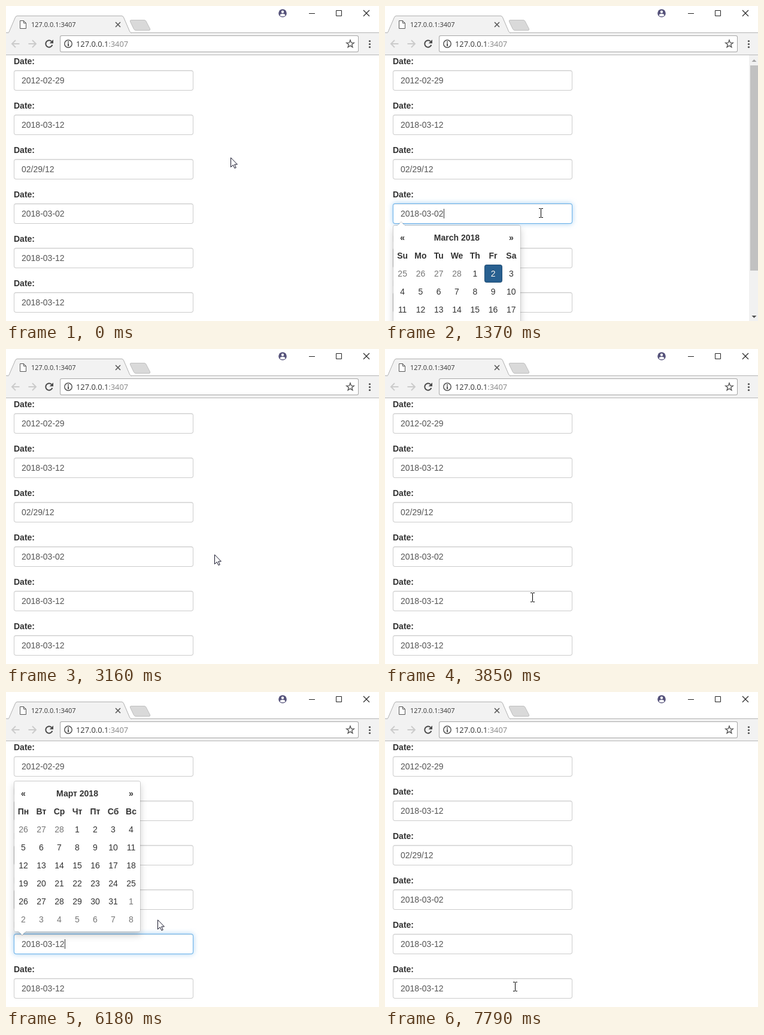
Write an HTML page with a canvas that moves like this. It is 623 px wide and 525 px high and loops after 8 s.

```html
<!DOCTYPE html>
<html lang="en">
<head>
<meta charset="utf-8">
<title>Date inputs</title>
<style>
html, body { margin: 0; width: 100%; height: 100%; overflow: hidden; background: #fff; }
canvas { display: block; }
</style>
</head>
<body>
<canvas id="stage" width="623" height="525"></canvas>
<script>
const ctx = document.getElementById('stage').getContext('2d');
const LOOP = 8000, STEP = 77;
const PAGE = '14px "Liberation Sans", Arial, sans-serif';
const BOLD = 'bold ' + PAGE;
const UI = '"Open Sans", "Noto Sans", sans-serif';

const dates = ['2012-02-29', '2018-03-12', '02/29/12', '2018-03-02', '2018-03-12', '2018-03-12'];
const inputTop = i => 107 + 74 * i;

// Pointer legs: start time, number of steps, destination
const legs = [
  [440, 10, 260, 345],
  [1770, 9, 351, 340],
  [3160, 10, 243, 416],
  [4790, 1, 243, 417],
  [5550, 9, 253, 379],
  [7020, 11, 217, 491]
];

// Each visit to a field: popup span, glow ramps, caret switch times
const visits = [
  { field: 3, open: 1210, close: 2930, glowIn: 1210, glowOut: 2860, caret: [1210, 1770, 2300, 2840] },
  { field: 4, open: 4080, close: 6580, glowIn: 4010, glowOut: 6565, caret: [4080, 4620, 5170, 5700, 6175, 6580] }
];

const calendars = {
  3: { top: 365, cell: 212 / 7, title: 'March 2018', days: 'Su Mo Tu We Th Fr Sa', lead: 4, prev: 28, rows: 6, active: 2, below: true },
  4: { top: 148, cell: 30, title: 'Март 2018', days: 'Пн Вт Ср Чт Пт Сб Вс', lead: 3, prev: 28, rows: 6, below: false }
};

const clamp = v => Math.max(0, Math.min(1, v));
const smooth = p => p * p * (3 - 2 * p);

function box(x, y, w, h, r) {
  const p = new Path2D();
  p.roundRect(x, y, w, h, r);
  return p;
}

function rect(x, y, w, h, color) {
  ctx.fillStyle = color;
  ctx.fillRect(x, y, w, h);
}

function disc(x, y, r, color) {
  ctx.fillStyle = color;
  ctx.beginPath();
  ctx.arc(x, y, r, 0, 7);
  ctx.fill();
}

function shape(d, fill, stroke, width = 1) {
  const p = new Path2D(d);
  if (fill) { ctx.fillStyle = fill; ctx.fill(p); }
  if (stroke) { ctx.strokeStyle = stroke; ctx.lineWidth = width; ctx.stroke(p); }
}

function text(s, x, y, font, color, align = 'left') {
  ctx.font = font;
  ctx.fillStyle = color;
  ctx.textAlign = align;
  ctx.fillText(s, x, y);
}

function drawWindow() {
  rect(0, 0, 623, 82, '#fff');
  rect(0, 44, 623, 37, '#f2f2f2');
  rect(0, 44, 623, 1, '#b4b4b4');
  rect(0, 81, 623, 1, '#b6b6b6');

  // Tab strip
  shape('M3.5 45C5 44 5.5 42 6 41L15.5 19Q16.5 16.5 19 16.5H193Q195.5 16.5 196.5 19L206 41C206.5 42 207 44 209.5 45', '#f2f2f2', '#b0b0b0');
  shape('M209 23.5H231Q233 23.5 234 25.5L240.5 38Q241.5 40.5 239 40.5H217Q214.5 40.5 213.5 38.5L207.5 26Q206.5 23.5 209 23.5Z', '#d9d9d9', '#bfbfbf');
  shape('M23.5 24.5H29.5L33.5 28.5V37.5H23.5ZM29.5 24.5V28.5H33.5', '#fff', '#555');
  text('127.0.0.1:3407', 42, 35, '11px ' + UI, '#333');
  shape('M183 27L191 35M191 27L183 35', null, '#5a5a5a', 1.7);

  // Window buttons
  disc(462, 12, 6.8, '#55527a');
  disc(462, 9.7, 2.2, '#fff');
  ctx.beginPath();
  ctx.ellipse(462, 15.2, 4.2, 2.1, 0, 0, 7);
  ctx.fill();
  rect(506, 12, 10, 1, '#222');
  shape('M551.5 7.5H560.5V16.5H551.5Z', null, '#222');
  shape('M597 7L607 17M607 7L597 17', null, '#222', 1.1);

  // Toolbar
  shape('M10 63H22.5M16 57L10 63L16 69', null, '#cbcbcb', 1.9);
  shape('M37.5 63H50M44 57L50 63L44 69', null, '#cbcbcb', 1.9);
  ctx.beginPath();
  ctx.arc(72, 63, 5.7, 0.35, 5.5);
  ctx.strokeStyle = '#484848';
  ctx.lineWidth = 2;
  ctx.stroke();
  shape('M79 56V62.3H72.7Z', '#484848');
  ctx.fillStyle = '#a6a6a6';
  ctx.fill(box(90, 49, 499, 28, 3));
  ctx.fillStyle = '#fff';
  ctx.fill(box(91, 50, 497, 26, 2));
  ctx.beginPath();
  ctx.arc(104, 63, 6.2, 0, 7);
  ctx.strokeStyle = '#555';
  ctx.lineWidth = 1.5;
  ctx.stroke();
  rect(103, 59, 2, 2, '#555');
  rect(103, 62, 2, 5, '#555');
  const urlFont = '12.85px ' + UI;
  text('127.0.0.1', 117, 68, urlFont, '#333');
  text(':3407', 117 + ctx.measureText('127.0.0.1').width, 68, urlFont, '#858585');

  ctx.beginPath();
  for (let i = 0; i < 10; i++) {
    const r = i % 2 ? 2.8 : 6.6, a = i * Math.PI / 5 - Math.PI / 2;
    ctx.lineTo(575 + r * Math.cos(a), 63.4 + r * Math.sin(a));
  }
  ctx.closePath();
  ctx.strokeStyle = '#555';
  ctx.lineWidth = 1.4;
  ctx.stroke();
  for (const y of [58, 63, 68]) disc(607.5, y + 0.5, 1.6, '#505050');
}

function drawField(i, glow) {
  const y = inputTop(i), outer = box(13, y, 300, 34, 4);
  text('Date:', 13, y - 10, BOLD, '#333');
  const mix = (a, b) => Math.round(a + (b - a) * glow);
  ctx.save();
  ctx.shadowBlur = 8;
  ctx.shadowColor = `rgba(102,175,233,${0.6 * glow})`;
  ctx.fillStyle = `rgb(${mix(204, 102)},${mix(204, 175)},${mix(204, 233)})`;
  ctx.fill(outer);
  ctx.restore();
  ctx.fillStyle = '#fff';
  ctx.fill(box(14, y + 1, 298, 32, 3));
  rect(15, y + 1, 296, 1, 'rgba(0,0,0,.06)');
  rect(15, y + 2, 296, 1, 'rgba(0,0,0,.02)');
  text(dates[i], 26, y + 22, PAGE, '#555');
}

function drawScrollbar() {
  rect(608, 82, 15, 443, '#f1f1f1');
  rect(610, 99, 13, 342, '#c1c1c1');
  shape('M612.5 93L616.5 89L620.5 93Z', '#a3a3a3');
  shape('M612.5 516L616.5 520L620.5 516Z', '#505050');
}

function drawCalendar(c) {
  const width = c.cell * 7, height = (c.rows + 2) * 30 + 10;
  const outer = box(13, c.top, width + 2, height + 2, 4);
  const inner = box(14, c.top + 1, width, height, 3);

  ctx.save();
  const outside = new Path2D();
  outside.rect(0, 0, 623, 700);
  outside.addPath(outer);
  ctx.clip(outside, 'evenodd');
  ctx.shadowColor = 'rgba(0,0,0,.175)';
  ctx.shadowBlur = 12;
  ctx.shadowOffsetY = 6;
  ctx.fillStyle = '#fff';
  ctx.fill(outer);
  ctx.restore();

  const ring = new Path2D(outer);
  ring.addPath(inner);
  ctx.fillStyle = 'rgba(0,0,0,.2)';
  ctx.fill(ring, 'evenodd');
  ctx.fillStyle = '#fff';
  ctx.fill(inner);

  const edge = c.below ? c.top + 1 : c.top + 1 + height;
  const dir = c.below ? -1 : 1;
  shape(`M20 ${edge}L27 ${edge + 7 * dir}L34 ${edge}Z`, 'rgba(0,0,0,.2)');
  shape(`M21 ${edge}L27 ${edge + 6 * dir}L33 ${edge}Z`, '#fff');
  rect(21, c.below ? edge - 1 : edge, 12, 1, '#fff');

  const colX = i => 14 + c.cell * (i + 0.5);
  const rowY = r => c.top + 26 + 30 * r;
  text('«', colX(0), rowY(0), BOLD, '#333', 'center');
  text(c.title, colX(3), rowY(0), BOLD, '#333', 'center');
  text('»', colX(6), rowY(0), BOLD, '#333', 'center');
  c.days.split(' ').forEach((d, i) => text(d, colX(i), rowY(1), BOLD, '#333', 'center'));

  for (let k = 0; k < c.rows * 7; k++) {
    const day = k - c.lead + 1, x = colX(k % 7), y = rowY(2 + Math.floor(k / 7));
    const inMonth = day >= 1 && day <= 31;
    const label = day < 1 ? c.prev + day : inMonth ? day : day - 31;
    const active = inMonth && day === c.active;
    if (active) {
      const left = Math.round(x - 15);
      ctx.fillStyle = '#204d74';
      ctx.fill(box(left, y - 20, 30, 30, 4));
      ctx.fillStyle = '#286090';
      ctx.fill(box(left + 1, y - 19, 28, 28, 3));
      text(label, x, y - 1, PAGE, 'rgba(0,0,0,.25)', 'center');
    }
    text(label, x, y, PAGE, active ? '#fff' : inMonth ? '#333' : '#777', 'center');
  }
}

function pointerAt(t) {
  let x = 375, y = 252;
  for (const [start, steps, toX, toY] of legs) {
    if (t < start) break;
    const p = smooth(clamp((Math.floor((t - start) / STEP) + 1) / steps));
    x += (toX - x) * p;
    y += (toY - y) * p;
  }
  return [Math.round(x), Math.round(y)];
}

function drawPointer(x, y) {
  const overField = x >= 13 && x < 313 && dates.some((_, i) => y >= inputTop(i) && y < inputTop(i) + 34);
  ctx.save();
  if (overField) {
    ctx.translate(x - 3, y - 8);
    for (const row of [0, 15]) {
      rect(0, row, 3, 1, '#000');
      rect(4, row, 3, 1, '#000');
    }
    rect(3, 1, 1, 14, '#000');
  } else {
    ctx.translate(x, y);
    shape('M.5 .8V16.5L4.3 12.9L6.9 18.4L9.2 17.4L6.7 12H11.4Z', '#fff', '#15152a');
  }
  ctx.restore();
}

function draw(t) {
  rect(0, 0, 623, 525, '#fff');
  const glowOf = v => smooth(clamp((t - v.glowIn) / 150)) - smooth(clamp((t - v.glowOut) / 150));
  dates.forEach((_, i) => {
    const visit = visits.find(v => v.field === i);
    drawField(i, visit ? glowOf(visit) : 0);
  });
  for (const v of visits) {
    if (v.caret.filter(s => s <= t).length % 2) rect(98, inputTop(v.field) + 9, 1, 16, '#333');
    if (t < v.open || t >= v.close) continue;
    drawCalendar(calendars[v.field]);
    if (calendars[v.field].below) drawScrollbar();
  }
  drawWindow();
  drawPointer(...pointerAt(t));
}

const began = performance.now();
function tick() {
  draw((performance.now() - began) % LOOP);
  requestAnimationFrame(tick);
}
tick();
</script>
</body>
</html>
```
